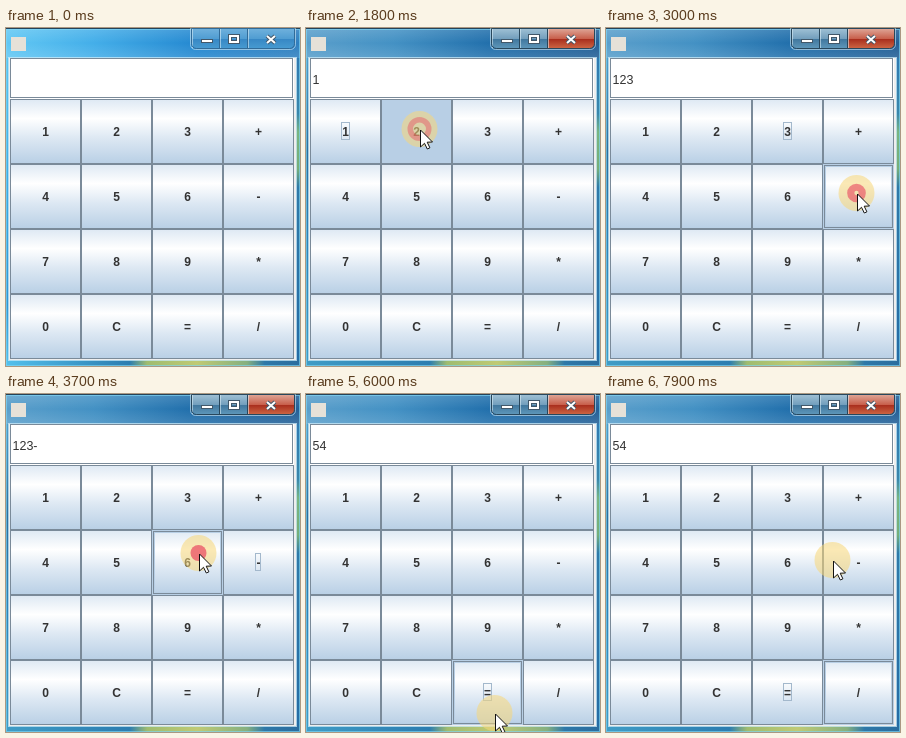
Animation, 294 px wide and 338 px high, one loop 8000 ms. Source, as an HTML page with a canvas:

```html
<!DOCTYPE html>
<html>
<head>
<meta charset="utf-8">
<style>
html, body { margin: 0; width: 294px; height: 338px; overflow: hidden; }
canvas { display: block; }
</style>
</head>
<body>
<canvas id="stage" width="294" height="338"></canvas>
<script>
const c = document.getElementById('stage').getContext('2d');
const LOOP = 8000, STEP = 100, LAG = 200;
const KEYS = '123+456-789*0C=/';
const CELL_W = 71, CELL_H = 65, LEFT = 4, TOP = 71;
const DARK = '#7a8a99', LIGHT = '#b8cfe5';

// pointer stops: time, x, y
const PATH = [
  [300, 312, 230], [900, 43, 104], [1300, 43, 104], [1600, 115, 102],
  [1950, 115, 102], [2150, 164, 101], [2600, 164, 101], [2900, 252, 166],
  [3250, 252, 166], [3500, 194, 160], [3950, 194, 160], [4150, 190, 235],
  [4550, 190, 235], [4800, 190, 320], [7200, 190, 320], [7500, 248, 300],
  [7650, 248, 300], [7900, 228, 167]
];
const CLICKS = [[1000, '1'], [1650, '2'], [2300, '3'], [2950, '-'],
  [3700, '6'], [4200, '9'], [5200, '=']];
const PRESS = 150, RELEASE = 300;

function pointer(t) {
  if (t < PATH[0][0]) return null;
  const i = PATH.findIndex(p => p[0] > t);
  if (i < 0) return PATH[PATH.length - 1].slice(1);
  const [t0, x0, y0] = PATH[i - 1], [t1, x1, y1] = PATH[i];
  const u = (t - t0) / (t1 - t0), e = u * u * (3 - 2 * u);
  return [x0 + (x1 - x0) * e, y0 + (y1 - y0) * e];
}

function keyAt(p) {
  if (!p) return '';
  const col = Math.floor((p[0] - LEFT) / CELL_W), row = Math.floor((p[1] - TOP) / CELL_H);
  return col >= 0 && col < 4 && row >= 0 && row < 4 ? KEYS[row * 4 + col] : '';
}

function rect(x, y, w, h, fill) {
  c.fillStyle = fill;
  c.fillRect(x, y, w, h);
}

function frame(x, y, w, h, color) {
  c.strokeStyle = color;
  c.lineWidth = 1;
  c.strokeRect(x + .5, y + .5, w - 1, h - 1);
}

function gradient(x0, y0, x1, y1, ...stops) {
  const g = c.createLinearGradient(x0, y0, x1, y1);
  for (const [at, color] of stops) g.addColorStop(at, color);
  return g;
}

function disc(x, y, r, fill, hole = 0) {
  c.fillStyle = fill;
  c.beginPath();
  c.arc(x, y, r, 0, 7);
  if (hole) c.arc(x, y, hole, 0, 7);
  c.fill('evenodd');
}

function drawWindow(active) {
  rect(0, 0, 294, 338, active
    ? gradient(0, 0, 294, 0, [0, '#5a9fcb'], [.3, '#4391c4'], [.62, '#2270ac'], [1, '#235f96'])
    : gradient(0, 0, 294, 0, [0, '#62c8f4'], [.3, '#43aee9'], [.65, '#2488d0'], [1, '#2f7fbf']));
  rect(0, 0, 294, 30, gradient(0, 0, 0, 30, [0, 'rgba(255,255,255,.15)'], [.5, 'rgba(255,255,255,0)'], [1, 'rgba(255,255,255,.12)']));

  // desktop showing through the glass borders
  rect(0, 30, 4, 308, active
    ? gradient(0, 30, 0, 338, [0, '#4f9cc8'], [.3, '#2b6f9f'], [.6, '#2e83b8'], [1, '#3f9cc6'])
    : gradient(0, 30, 0, 338, [0, '#58c4f0'], [.4, '#3cabe4'], [.8, '#2f95d4'], [1, '#52c0ec']));
  rect(289, 30, 5, 308, gradient(0, 30, 0, 338, [0, '#2f79b0'], [.18, '#3a86ab'],
    [.24, '#79b582'], [.36, '#76ae78'], [.42, '#2f79a8'], [1, '#246ba4']));
  rect(0, 332, 294, 6, gradient(0, 0, 294, 0, [0, active ? '#3f9cc6' : '#52c0ec'],
    [.42, '#2c7db0'], [.48, '#9fbc70'], [.65, '#c0ca74'], [.82, '#86b080'], [.88, '#2e78a8'], [1, '#2a6c9e']));

  // glass edges
  frame(0, 1, 294, 337, 'rgba(130,215,245,.65)');
  rect(0, 0, 294, 1, '#24435a');
  frame(2, 29, 289, 304, 'rgba(205,235,248,.75)');

  rect(5, 9, 15, 14, '#e6e1d8');
  drawCaptionButtons(active);
}

function captionOutline(grow) {
  c.beginPath();
  c.roundRect(185.5 - grow, .5, 103 + 2 * grow, 20 + grow, [0, 0, 5, 5]);
}

function drawCaptionButtons(active) {
  const glass = active
    ? gradient(0, 1, 0, 21, [0, '#9dbfd4'], [.48, '#739fbd'], [.5, '#40769d'], [1, '#6099bc'])
    : gradient(0, 1, 0, 21, [0, '#6eb0dc'], [.48, '#509dd2'], [.5, '#3787c4'], [1, '#489cd2']);
  const red = gradient(0, 1, 0, 21, [0, '#dea394'], [.48, '#c8604c'], [.5, '#a82d1c'], [1, '#cf6946']);
  c.save();
  captionOutline(0);
  c.clip();
  rect(186, 1, 55, 20, glass);
  rect(241, 1, 48, 20, active ? red : glass);
  c.restore();

  c.lineWidth = 1;
  c.strokeStyle = 'rgba(225,242,250,.55)';
  captionOutline(1);
  for (const x of [187, 215, 243]) { c.moveTo(x - .5, 1); c.lineTo(x - .5, 20); }
  c.stroke();
  c.strokeStyle = active ? '#28475c' : '#316b98';
  captionOutline(0);
  for (const x of [213.5, 241.5]) { c.moveTo(x, 1); c.lineTo(x, 20); }
  c.stroke();

  rect(195, 11, 12, 4, '#42586a');
  rect(196, 12, 10, 2, '#fff');
  for (const [color, width] of [['#42586a', 4], ['#fff', 2]]) {
    c.strokeStyle = color;
    c.lineWidth = width;
    c.strokeRect(224, 8, 8, 6);
    c.beginPath();
    c.moveTo(261, 8); c.lineTo(269, 15);
    c.moveTo(269, 8); c.lineTo(261, 15);
    c.stroke();
  }
}

function drawField(text) {
  rect(3, 30, 287, 302, '#eee');
  rect(4, 30, 284, 41, '#fff');
  frame(4, 30, 283, 40, DARK);
  c.font = '12.5px "Liberation Sans", Arial, sans-serif';
  c.textAlign = 'left';
  c.fillStyle = '#333';
  c.fillText(text, 6.5, 56);
}

function drawKey(label, i, hover, pressed, focus) {
  const x = LEFT + i % 4 * CELL_W, y = TOP + Math.floor(i / 4) * CELL_H;
  rect(x, y, CELL_W, CELL_H, pressed ? LIGHT
    : gradient(0, y, 0, y + CELL_H, [0, '#dde8f3'], [.3, '#fff'], [.6, '#dde8f3'], [1, LIGHT]));
  const edges = hover && !pressed ? [LIGHT, DARK, LIGHT] : [DARK];
  edges.forEach((color, n) => frame(x + n, y + n, CELL_W - 2 * n, CELL_H - 2 * n, color));
  c.font = 'bold 12px "Liberation Sans", Arial, sans-serif';
  c.textAlign = 'center';
  c.fillStyle = '#333';
  c.fillText(label, x + 35.5, y + 37);
  if (focus) {
    const w = label === '-' ? 6 : 9;
    frame(x + 35 - Math.floor(w / 2), y + 23, w, 18, '#a3b8cc');
  }
}

function drawPointer([x, y], since) {
  disc(x - 1.5, y - 1, 18, 'rgba(248,216,120,.55)');
  if (since >= 0 && since < RELEASE) {
    const p = since / RELEASE;
    disc(x - 1.5, y - 1, 8 + 8 * p, `rgba(232,70,95,${.7 - .55 * p})`, 13 * p);
  }
  c.beginPath();
  for (const [dx, dy] of [[0, 0], [0, 17], [4, 13.3], [6.8, 19], [9.4, 17.8], [6.7, 12.2], [12, 12]])
    c.lineTo(x - .5 + dx, y + dy);
  c.closePath();
  c.fillStyle = '#fff';
  c.fill();
  c.strokeStyle = '#111';
  c.lineWidth = 1;
  c.stroke();
}

function draw(t) {
  const started = CLICKS.filter(k => k[0] <= t).pop();
  const since = started ? t - started[0] : -1;
  const done = CLICKS.filter(k => k[0] + RELEASE <= t).map(k => k[1]).join('');
  const focus = done.slice(-1);
  const pressed = since >= PRESS && since < RELEASE ? started[1] : '';
  const hover = keyAt(pointer(t - LAG));

  drawWindow(t >= 1100);
  drawField(focus === '=' ? '54' : done);
  [...KEYS].forEach((k, i) => drawKey(k, i, k === hover, k === pressed, k === focus));
  const p = pointer(t);
  if (p) drawPointer(p, since);
}

const start = performance.now();
function tick() {
  const t = (performance.now() - start) % LOOP;
  draw(Math.floor(t / STEP) * STEP);
  requestAnimationFrame(tick);
}
tick();
</script>
</body>
</html>
```
